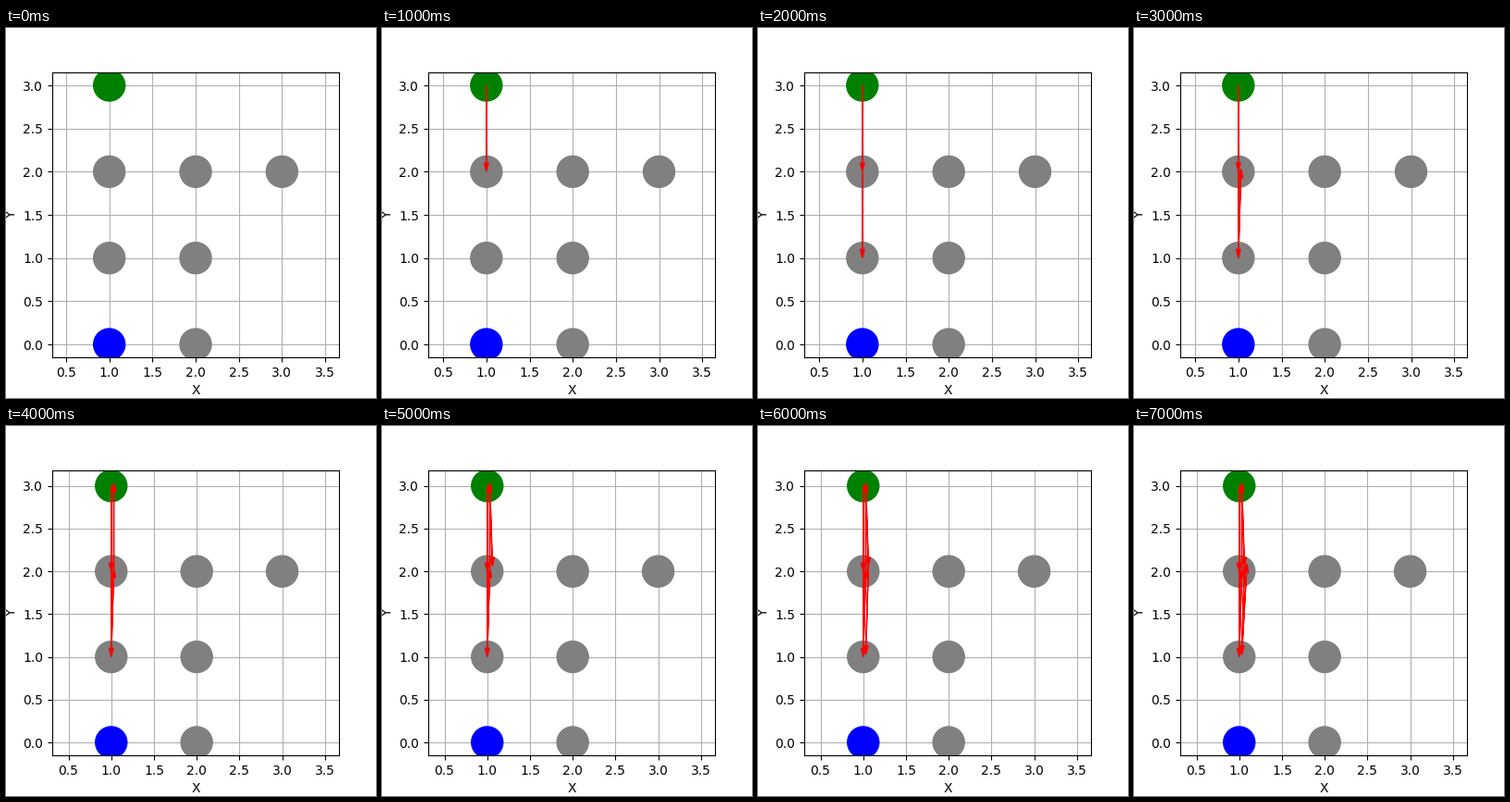
Animation, 400 px wide and 400 px high, one loop 8000 ms. Source, as a matplotlib script:

```python
import matplotlib.pyplot as plt
from matplotlib.animation import FuncAnimation

NODES = [(1, 0), (2, 0), (1, 1), (2, 1), (1, 2), (2, 2), (3, 2), (1, 3)]
START, GOAL = (1, 3), (1, 0)
WALK = [(1, 3), (1, 2), (1, 1), (1, 2), (1, 3), (1, 2), (1, 1), (1, 2)]
SHIFT = 0.03
HEAD = 0.05


def shifted_walk():
    """Nudge each repeated visit diagonally so that the arrows stay apart."""
    points = []
    for i, (x, y) in enumerate(WALK):
        offset = SHIFT * WALK[:i].count((x, y))
        points.append((x + offset, y + offset))
    return points


PATH = shifted_walk()


def node_color(node):
    return {START: "green", GOAL: "blue"}.get(node, "gray")


def fit_view(step):
    """Limits with 5% margins and an equal scale on both axes."""
    left = 1 - HEAD / 2 if step else 1
    top = max(y for _, y in PATH[:step + 1])
    center = (left + 3) / 2
    half = 1.1 * top * 310 / 308 / 2
    ax.set_xlim(center - half, center + half)
    ax.set_ylim(-0.05 * top, 1.05 * top)


def draw(step):
    ax.clear()
    ax.set_axisbelow(True)
    ax.grid(True)
    ax.set_xlabel("X")
    ax.set_ylabel("Y")
    xs, ys = zip(*NODES)
    ax.scatter(xs, ys, s=600, c=[node_color(n) for n in NODES], zorder=2)
    for (x0, y0), (x1, y1) in zip(PATH[:step], PATH[1:step + 1]):
        ax.arrow(x0, y0, x1 - x0, y1 - y0, head_width=HEAD, head_length=0.1,
                 length_includes_head=True, fc="red", ec="red", zorder=3)
    fit_view(step)


fig, ax = plt.subplots(figsize=(4, 4), dpi=100)
anim = FuncAnimation(fig, draw, frames=len(WALK), init_func=lambda: None,
                     interval=1000, repeat=True, repeat_delay=0)
plt.show()
```
